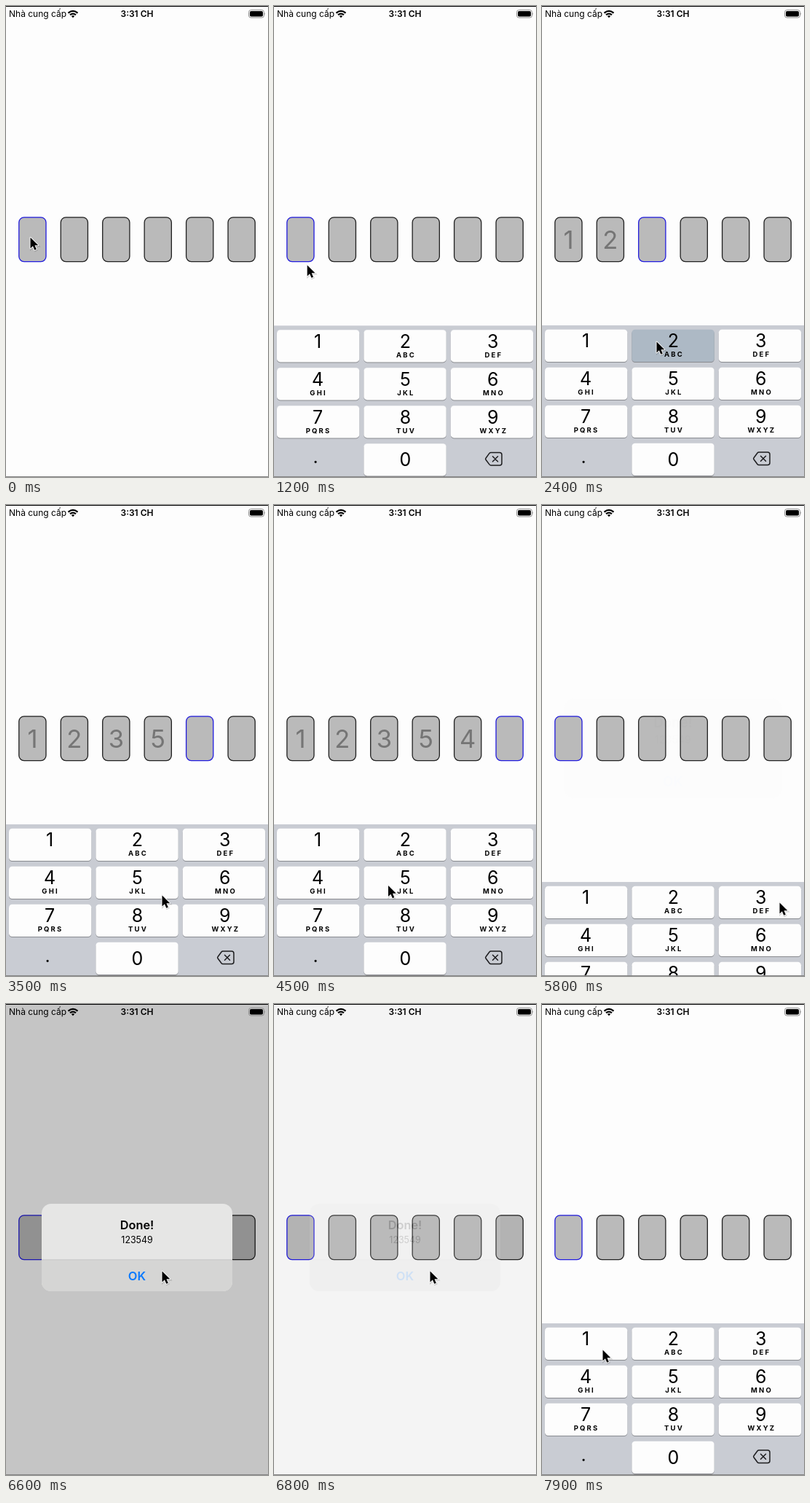
These frames come from a looping animation (360x646 px, 8000 ms). An HTML page:

```html
<!DOCTYPE html>
<html lang="vi">
<head>
<meta charset="utf-8">
<title>Code entry</title>
<style>
  html, body { margin: 0; width: 100%; height: 100%; overflow: hidden; background: #fdfdfd; }
  svg { display: block; width: 100%; height: 100%; font-family: Inter, Roboto, sans-serif; }
  .mid { text-anchor: middle; }
  .cell { fill: #bababa; stroke-width: 1.3; }
  .code { font-size: 34.5px; fill: #757575; }
  .num { font-size: 25px; fill: #000; }
  .abc { font-size: 9.5px; font-weight: 700; letter-spacing: 2.2px; }
</style>
</head>
<body>
<svg id="stage" viewBox="0 0 360 646" preserveAspectRatio="none">
  <rect width="360" height="646" fill="#fdfdfd"/>
  <g id="cells"></g>
  <g id="keyboard">
    <rect y="438" width="360" height="210" fill="#c9ccd3"/>
    <g id="keys"></g>
    <text class="num mid" x="57" y="627">.</text>
    <g fill="none" stroke="#1c1c1e" stroke-width="1.5" stroke-linecap="round" stroke-linejoin="round">
      <path d="M298 612h12q3 0 3 3v11.500q0 3-3 3h-12q-1.200 0-2-1l-5-6.700q-.8-1 0-2l5-6.800q.8-1 2-1z"/>
      <path d="M300.500 617.300l7 7m0-7l-7 7"/>
    </g>
  </g>
  <rect id="dim" width="360" height="646"/>
  <g id="alert">
    <clipPath id="round"><rect x="49" y="274" width="262" height="120" rx="13"/></clipPath>
    <g clip-path="url(#round)">
      <rect x="49" y="274" width="262" height="120" fill="#e6e6e5"/>
      <rect id="okCell" x="49" y="351" width="262" height="43"/>
      <rect x="49" y="350.500" width="262" height=".7" fill="#b9b9b9"/>
    </g>
    <g class="mid">
      <text x="180" y="308.500" font-size="16.300" font-weight="600">Done!</text>
      <text x="180" y="328" font-size="12.400">123549</text>
      <text x="180" y="379" font-size="16.500" font-weight="600" fill="#0a7aff">OK</text>
    </g>
  </g>
  <g id="status">
    <text x="4" y="15.300" font-size="12">Nhà cung cấp</text>
    <text class="mid" x="180" y="15.300" font-size="12" font-weight="600">3:31 CH</text>
    <g fill="none" stroke="#000" stroke-width="2.300">
      <path d="M85.500 9.600q6.500-5.400 13 0M88 12.200q4-3.200 8 0"/>
    </g>
    <path d="M89.800 13.800q2.200-1.600 4.400 0l-2.200 2.400z"/>
    <rect x="333.500" y="5.500" width="21" height="10.500" rx="3" fill="none" stroke="#8d8d8d"/>
    <rect x="335" y="7" width="18" height="7.500" rx="1.800"/>
    <path d="M355.500 9q1.600 1.700 0 3.500z" fill="#8d8d8d"/>
  </g>
  <rect width="360" height="1"/>
  <rect y="645" width="360" height="1" fill="#858585"/>
  <g id="cursor">
    <path d="M0 0V15L3.400 11.800L5.800 17.300L8.300 16.200L6 10.800H10.800Z" transform="translate(.6 1)" fill="#000" stroke="#000" stroke-width="2.200" opacity=".16"/>
    <path d="M0 0V15L3.400 11.800L5.800 17.300L8.300 16.200L6 10.800H10.800Z" stroke="#fff" stroke-width="1.900" paint-order="stroke" stroke-linejoin="round"/>
  </g>
</svg>
<script>
const LOOP = 8000;
const $ = id => document.getElementById(id);

function add(parent, tag, attrs, text = '') {
  const node = document.createElementNS('http://www.w3.org/2000/svg', tag);
  for (const name in attrs) node.setAttribute(name, attrs[name]);
  node.textContent = text;
  parent.append(node);
  return node;
}

const cells = Array.from({ length: 6 }, (_, i) => {
  const x = 17.8 + i * 57.45;
  return {
    box: add($('cells'), 'rect', { class: 'cell', x, y: 289.8, width: 37.2, height: 60.8, rx: 7 }),
    text: add($('cells'), 'text', { class: 'code mid', x: x + 18.6, y: 332.5 })
  };
});

const keys = {};
const letters = ['', 'ABC', 'DEF', 'GHI', 'JKL', 'MNO', 'PQRS', 'TUV', 'WXYZ'];
function addKey(label, col, row, abc) {
  const x = 4 + col * 119.4, y = 443.8 + row * 52, center = 60 + col * 120.4;
  const shape = { x, width: 113.3, height: 44.2, rx: 4.5 };
  add($('keys'), 'rect', { ...shape, y: y + 1, fill: '#898b90' });
  keys[label] = add($('keys'), 'rect', { ...shape, y });
  add($('keys'), 'text', { class: 'num mid', x: center, y: y + (abc === undefined ? 30.8 : 24.4) }, label);
  if (abc) add($('keys'), 'text', { class: 'abc mid', x: center + 1.1, y: y + 37.6 }, abc);
}
letters.forEach((abc, i) => addKey(String(i + 1), i % 3, Math.floor(i / 3), abc));
addKey('0', 1, 3);

// [key, pressed, released, digit shown]
const taps = [
  ['1', 1800, 1950, 1900], ['2', 2300, 2480, 2390], ['3', 2700, 2880, 2800],
  ['5', 3100, 3290, 3200], ['4', 3900, 4090, 4000], ['9', 5550, 5740, 5700]
];
const CLEARED = 5700;

// [time, x, y]
const path = [
  [0, 33.5, 317.5], [1000, 33.5, 317.5], [1600, 80, 463], [1950, 80, 463],
  [2250, 157.5, 460.5], [2480, 157.5, 460.5], [2680, 301, 463], [2850, 301, 463],
  [3080, 205, 517], [3280, 205, 517], [3480, 214.5, 535.5], [3560, 214.5, 535.5],
  [3850, 82, 515], [4100, 82, 515], [4400, 157, 522], [4600, 157, 522],
  [5250, 326, 537], [5500, 326.5, 545.5], [5800, 326.5, 545.5],
  [6350, 214.5, 366.5], [7000, 214.5, 366.5], [7700, 83.5, 474.5], [LOOP, 83.5, 474.5]
];

const ramp = (t, from, to) => Math.min(1, Math.max(0, (t - from) / (to - from)));
const smooth = p => p * p * (3 - 2 * p);
const settle = p => 1 - (1 - p) ** 3;

function cursorAt(t) {
  const i = path.findIndex(step => step[0] > t);
  const [t0, x0, y0] = path[i - 1], [t1, x1, y1] = path[i];
  const p = smooth(ramp(t, t0, t1));
  return [x0 + (x1 - x0) * p, y0 + (y1 - y0) * p];
}

function draw(t) {
  const count = t < CLEARED ? taps.filter(tap => tap[3] <= t).length : 0;
  cells.forEach(({ box, text }, i) => {
    box.setAttribute('stroke', i === count ? '#211bdd' : '#202020');
    text.textContent = i < count ? taps[i][0] : '';
  });

  const held = taps.find(([, down, up]) => t >= down && t < up);
  for (const label in keys) {
    keys[label].setAttribute('fill', held && held[0] === label ? '#adb9c5' : '#fdfdfd');
  }

  const raised = settle(ramp(t, 850, 1250)) - settle(ramp(t, 5750, 6100)) + settle(ramp(t, 7050, 7450));
  $('keyboard').setAttribute('transform', `translate(0 ${(1 - raised) * 210})`);

  const entered = settle(ramp(t, 5800, 6150));
  const shown = entered - smooth(ramp(t, 6600, 6867));
  const scale = 1.15 - .15 * entered;
  $('dim').setAttribute('opacity', .225 * shown);
  $('alert').setAttribute('opacity', shown);
  $('alert').setAttribute('transform', `translate(180 334) scale(${scale}) translate(-180 -334)`);
  $('okCell').setAttribute('fill', t >= 6450 ? '#d5d5d4' : '#e6e6e5');

  $('cursor').setAttribute('transform', `translate(${cursorAt(t)})`);
}

const start = performance.now();
function tick() {
  draw((performance.now() - start) % LOOP);
  requestAnimationFrame(tick);
}
tick();
</script>
</body>
</html>
```
